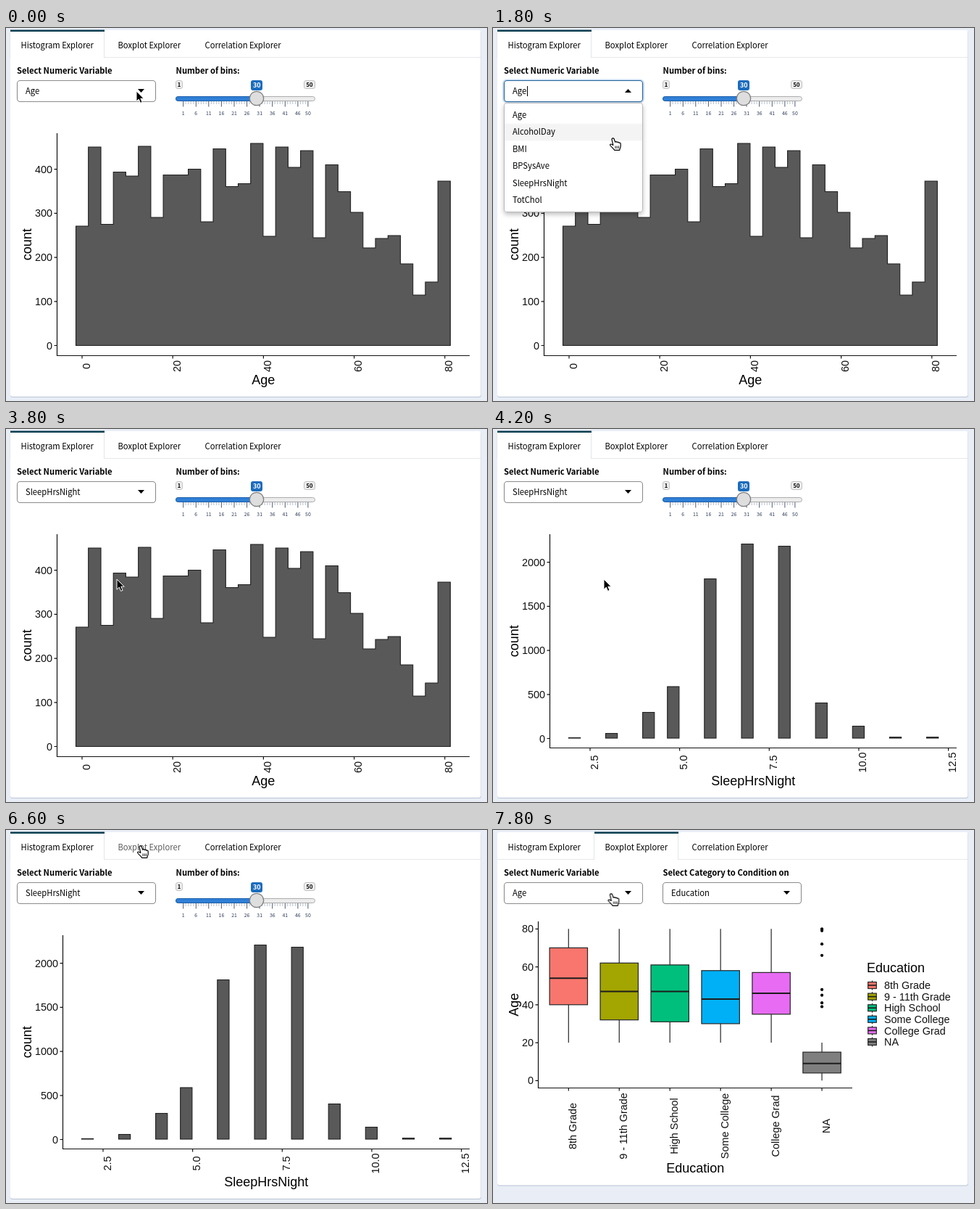
An HTML page that plays this animation: 664x514 px, repeating every 8 s.

```html
<!DOCTYPE html>
<html lang="en">
<head>
<meta charset="utf-8">
<title>Data explorer</title>
<style>
html, body { margin: 0; width: 100%; height: 100%; overflow: hidden; background: #e9eef6; }
svg { display: block; }
text { font: 500 11.22px "Noto Sans CJK JP", "Noto Sans CJK SC", "Noto Sans CJK", Lato, sans-serif; fill: #000; }
.bold { font-weight: 700; }
.tiny { font-size: 6.9px; fill: #2c3a55; }
.badge { font-size: 7.6px; font-weight: 700; }
.white { fill: #fff; font-size: 9px; }
.tick, .title { font: 14.4px "Liberation Sans", Arial, sans-serif; fill: #111; }
.title { font-size: 18px; fill: #000; }
.mid { text-anchor: middle; }
.end { text-anchor: end; }
.axis { fill: none; stroke: #111; stroke-width: 1.2; }
.bars { fill: #595959; stroke: #1f1f1f; stroke-width: 1.1; }

.timed, .row, .tabName { animation: 8s step-end infinite; }
.histTab { animation-name: histTab; }
.boxTab { animation-name: boxTab; }
.ageChart { animation-name: ageChart; }
.sleepChart { animation-name: sleepChart; }
.ageClosed { animation-name: ageClosed; }
.open { animation-name: open; }
.sleepClosed { animation-name: sleepClosed; }
.arrow { animation-name: arrow; }
.hand { animation-name: hand; }
.row { animation-name: row; }
.tabName { animation-name: tabName; }
.pointer { animation: pointer 8s infinite; }

@keyframes histTab { 0% { visibility: visible } 87.5%, 100% { visibility: hidden } }
@keyframes boxTab { 0% { visibility: hidden } 87.5%, 100% { visibility: visible } }
@keyframes ageChart { 0% { visibility: visible } 52.5%, 100% { visibility: hidden } }
@keyframes sleepChart { 0% { visibility: hidden } 52.5% { visibility: visible } 87.5%, 100% { visibility: hidden } }
@keyframes ageClosed { 0% { visibility: visible } 7.5%, 100% { visibility: hidden } }
@keyframes open { 0% { visibility: hidden } 7.5% { visibility: visible } 42.5%, 100% { visibility: hidden } }
@keyframes sleepClosed { 0% { visibility: hidden } 42.5% { visibility: visible } 87.5%, 100% { visibility: hidden } }
@keyframes arrow {
  0% { visibility: visible } 15% { visibility: hidden } 42.5% { visibility: visible }
  77.5% { visibility: hidden } 90% { visibility: visible } 95%, 100% { visibility: hidden }
}
@keyframes hand {
  0% { visibility: hidden } 15% { visibility: visible } 42.5% { visibility: hidden }
  77.5% { visibility: visible } 90% { visibility: hidden } 95%, 100% { visibility: visible }
}
@keyframes row {
  0% { transform: none } 17.5% { transform: translateY(23.4px) } 25% { transform: translateY(46.8px) }
  27.5% { transform: translateY(70.2px) } 30%, 100% { transform: translateY(93.6px) }
}
@keyframes tabName { 0% { fill: #000 } 77.5% { fill: #5c5c5c } 87.5%, 100% { fill: #000 } }
/* The pointer is sampled every 200 ms. */
@keyframes pointer {
  0% { transform: translate(180px, 87px) }
  10% { transform: translate(180px, 87px); animation-timing-function: steps(4) }
  20%, 22.5% { transform: translate(166px, 152px); animation-timing-function: steps(4) }
  32.5% { transform: translate(152.5px, 208.5px) }
  42.5%, 52.5% { transform: translate(153px, 207px); animation-timing-function: steps(4) }
  62.5%, 67.5% { transform: translate(166px, 99px); animation-timing-function: steps(5) }
  80%, 87.5% { transform: translate(186px, 22px); animation-timing-function: steps(3) }
  95%, 100% { transform: translate(163.5px, 88px) }
}
</style>
</head>
<body>
<script>
const text = (x, y, label, cls = '', turned = false) =>
  `<text class="${cls}" transform="translate(${x} ${y})${turned ? ' rotate(-90)' : ''}">${label}</text>`;
const rect = (x, y, w, h, fill, extra = '') =>
  `<rect x="${x}" y="${y}" width="${w}" height="${h}" fill="${fill}" ${extra}/>`;
const path = (d, extra) => `<path d="${d}" ${extra}/>`;
const group = (cls, ...parts) => `<g class="${cls}">${parts.join('')}</g>`;
const timed = (name, ...parts) => group('timed ' + name, ...parts);
const span = (count, make) => Array.from({ length: count }, (_, i) => make(i)).join('');

function panel(bottom, left, right) {
  const h = bottom - 3;
  return rect(6, 4, 650, h, '#bcc5d6', 'rx="3"') + rect(6, 3, 649.5, h, '#fff', 'rx="3"') +
    path(`M6 40.5H${left}M${right} 40.5H655`, 'stroke="#e6e8ec"') +
    path(`M${left - .5} 5V41M${right - .5} 5V41`, 'stroke="#e3e5e9"') +
    rect(left, 2.5, right - left, 2.5, '#0b3f50');
}

function select(x, label, { open = false } = {}) {
  const caret = open ? `M${x + 167} 89h9l-4.5-5z` : `M${x + 167} 84h9l-4.5 5z`;
  const glow = open ? rect(x - 1, 71.5, 194, 31, 'none', 'rx="5" stroke="#c7dcf2" stroke-width="2"') : '';
  return glow + rect(x + .5, 72.5, 191, 29, '#fff', `rx="4" stroke="${open ? '#26649b' : '#8c8c8c'}" stroke-width="1.1"`) +
    text(x + 12, 91, label) + path(caret, 'fill="#000"');
}

function menu() {
  const items = ['Age', 'AlcoholDay', 'BMI', 'BPSysAve', 'SleepHrsNight', 'TotChol'];
  return rect(15.5, 103.5, 191, 150, '#fff', 'rx="3" stroke="#b8b8b8" filter="url(#shadow)"') +
    rect(16, 108.5, 190, 23.4, '#f4f4f4', 'class="row"') +
    items.map((item, i) => text(27, 124 + 23.4 * i, item)).join('');
}

function slider() {
  const at = n => 244.7 + 3.515 * (n - 1);
  const isMajor = i => i % 5 === 0 || i === 49;
  const ticks = (major, length) =>
    span(50, i => isMajor(i) === major ? `M${at(i + 1).toFixed(1)} 101v${length}` : '');
  const labels = span(11, i => {
    const n = Math.min(1 + 5 * i, 50);
    return text(at(n), 120, n, 'tiny mid');
  });
  return text(234.5, 63, 'Number of bins:', 'bold') +
    rect(234.5, 72.5, 9, 11, '#ececec', 'rx="2.5" stroke="#c4c4c4"') + text(239, 81, 1, 'badge mid') +
    rect(411.5, 72.5, 15, 11, '#ececec', 'rx="2.5" stroke="#c4c4c4"') + text(419, 81, 50, 'badge mid') +
    rect(338, 72, 16, 14, '#1c6cbd', 'rx="3"') + text(346.2, 82.3, 30, 'badge white mid') +
    path(ticks(false, 4), 'stroke="#9aa3b4" stroke-width=".7"') +
    path(ticks(true, 7.5), 'stroke="#4d5b76" stroke-width="1"') + labels +
    rect(234.5, 94.5, 192, 6, '#ececec', 'rx="3" stroke="#adadad"') +
    rect(234.5, 94.5, 112, 6, '#2f7fd6', 'rx="3" stroke="#1d5fa8"') +
    '<circle cx="346" cy="97" r="9.7" fill="#dedede" stroke="#7d7d7d" stroke-width="1.3"/>';
}

// Axis lines with ticks; xs and ys hold [position, label] pairs.
function axes({ left, top = 145, bottom, right, xs, ys, labelY, xTitle, yTitle, yTitleX = 35.3, titleY = 491 }) {
  const marks = xs.map(([x]) => `M${x} ${bottom}v4`).join('') + ys.map(([y]) => `M${left} ${y}h-4`).join('');
  return path(`M${left} ${top}V${bottom}H${right}${marks}`, 'class="axis"') +
    ys.map(([y, s]) => text(left - 6.5, y + 5, s, 'tick end')).join('') +
    xs.map(([x, s]) => text(x + 10.5, labelY, s, 'tick mid', true)).join('') +
    text((left + right) / 2, titleY, xTitle, 'title mid') +
    text(yTitleX, (top + bottom) / 2, yTitle, 'title mid', true);
}

const scale = (count, from, step, label) => Array.from({ length: count }, (_, i) => [from + step * i, label(i)]);

function ageHistogram() {
  const tops = [273, 164, 270.5, 198.5, 204, 163, 261, 202.5, 202.5, 194.5, 267, 166.5, 218.5, 214.5, 159,
    287, 164, 192, 169, 289, 188.5, 225.5, 254, 303, 290, 286, 325, 368, 350, 211];
  const outline = tops.map((y, i) => `V${y}H${(96.5 + 17.23 * (i + 1)).toFixed(1)}`).join('');
  return path(`M96.5 437.5${outline}V437.5Z`, 'class="bars"') +
    axes({ left: 70.5, bottom: 451.5, right: 640, labelY: 466, xTitle: 'Age', yTitle: 'count',
      xs: scale(5, 105, 125.2, i => 20 * i), ys: scale(5, 437.5, -60.7, i => 100 * i) });
}

function sleepHistogram() {
  const bins = [[0, 425.4], [3, 419.5], [6, 390.5], [8, 355], [11, 206.5], [14, 158.5], [17, 161.5],
    [20, 377.5], [23, 409.5], [26, 424.6], [29, 424.6]];
  const bars = bins.map(([k, y]) => rect((104.4 + 17.04 * k).toFixed(1), y, 16.2, 426 - y, '#595959')).join('');
  return group('bars', bars) +
    axes({ left: 78.5, bottom: 439.5, right: 640, labelY: 459.5, xTitle: 'SleepHrsNight', yTitle: 'count',
      xs: scale(5, 134, 123.65, i => (2.5 * (i + 1)).toFixed(1)), ys: scale(5, 426.5, -60.7, i => 500 * i) });
}

function boxplot() {
  // name, colour, low, first quartile, median, third quartile, high
  const groups = [
    ['8th Grade', '#f8766d', 20, 40, 54, 70, 80],
    ['9 - 11th Grade', '#a3a500', 20, 32, 47, 62, 80],
    ['High School', '#00bf7d', 20, 31, 47, 61, 80],
    ['Some College', '#00b0f6', 20, 30, 43, 58, 80],
    ['College Grad', '#e76bf3', 20, 35, 46, 57, 80],
    ['NA', '#7f7f7f', 0, 4, 9, 15, 20]];
  const yAt = v => 345.3 - 2.613 * v, xAt = i => 104.3 + 69.95 * i;
  const line = 'stroke="#262626" stroke-width="1.2"';
  const boxes = groups.map(([, colour, low, q1, median, q3, high], i) => {
    const x = xAt(i);
    return path(`M${x} ${yAt(low)}V${yAt(high)}`, line) +
      rect(x - 26.2, yAt(q3), 52.4, yAt(q1) - yAt(q3), colour, line) +
      path(`M${x - 26.2} ${yAt(median)}h52.4`, 'stroke="#1c1c1c" stroke-width="2"');
  }).join('');
  const dots = [80, 79, 72, 66, 48, 45, 41, 39]
    .map(v => `<circle cx="${xAt(5)}" cy="${yAt(v)}" r="2.1"/>`).join('');
  const legend = groups.map(([name, colour], i) => {
    const y = 214 + 15.6 * i;
    return path(`M523.5 ${y - 6.5}v13`, line) + rect(517.7, y - 4.5, 11.6, 9, colour, line) +
      path(`M517.7 ${y}h11.6`, 'stroke="#1c1c1c" stroke-width="1.6"') + text(540, y + 5.2, name, 'tick');
  }).join('');
  return axes({ left: 62.5, top: 126, bottom: 355.5, right: 496, labelY: 408, titleY: 472,
    xTitle: 'Education', yTitle: 'Age',
    xs: groups.map(([name], i) => [xAt(i), name]), ys: scale(5, 345.3, -52.25, i => 20 * i) }) +
    boxes + dots + text(516, 196, 'Education', 'title') + legend;
}

const arrow = path('M0 0V14.2L3.3 11.1 5.6 16.4 8.1 15.3 5.8 10.2H10.2Z', 'fill="#000" stroke="#fff" stroke-width="1"');
const hand = path('M-2 1.4C-1.8-.4 .5-.6 1.2 1L2.7 5.2C3.5 4.3 5 4.6 5.3 5.6 6.2 4.8 7.8 5.2 8 6.3 9 5.8 10.2 6.4 ' +
  '10.2 7.6V11C10.2 12.5 9 14 8.8 16.3H1.6C1 14.5-2 12.5-4 10-5 8.6-3.4 7.4-2 8.4L-.2 9.4Z',
  'fill="#fff" stroke="#000" stroke-width="1.2" stroke-linejoin="round"') +
  path('M3 10.5v3.5M5.2 10.5v3.5M7.4 10.5v3.5', 'stroke="#000" stroke-width=".9"');

document.body.innerHTML = `<svg width="664" height="514" viewBox="0 0 664 514">
<filter id="shadow" x="-10%" y="-10%" width="120%" height="125%">
  <feDropShadow dx="0" dy="3" stdDeviation="3" flood-opacity=".25"/>
</filter>` +
  timed('histTab', panel(508, 6, 136), slider()) +
  timed('ageChart', ageHistogram()) +
  timed('sleepChart', sleepHistogram()) +
  timed('boxTab', panel(489.5, 140, 256), boxplot(), select(15, 'Age'), select(234, 'Education'),
    text(234.5, 63, 'Select Category to Condition on', 'bold')) +
  text(15, 63, 'Select Numeric Variable', 'bold') +
  text(20.5, 28, 'Histogram Explorer') + text(154.5, 28, 'Boxplot Explorer', 'tabName') +
  text(274.5, 28, 'Correlation Explorer') +
  timed('ageClosed', select(15, 'Age')) +
  timed('sleepClosed', select(15, 'SleepHrsNight')) +
  timed('open', select(15, 'Age', { open: true }), path('M47.5 80v14', 'stroke="#000"'), menu()) +
  group('pointer', timed('arrow', arrow), timed('hand', hand)) + '</svg>';
</script>
</body>
</html>
```
